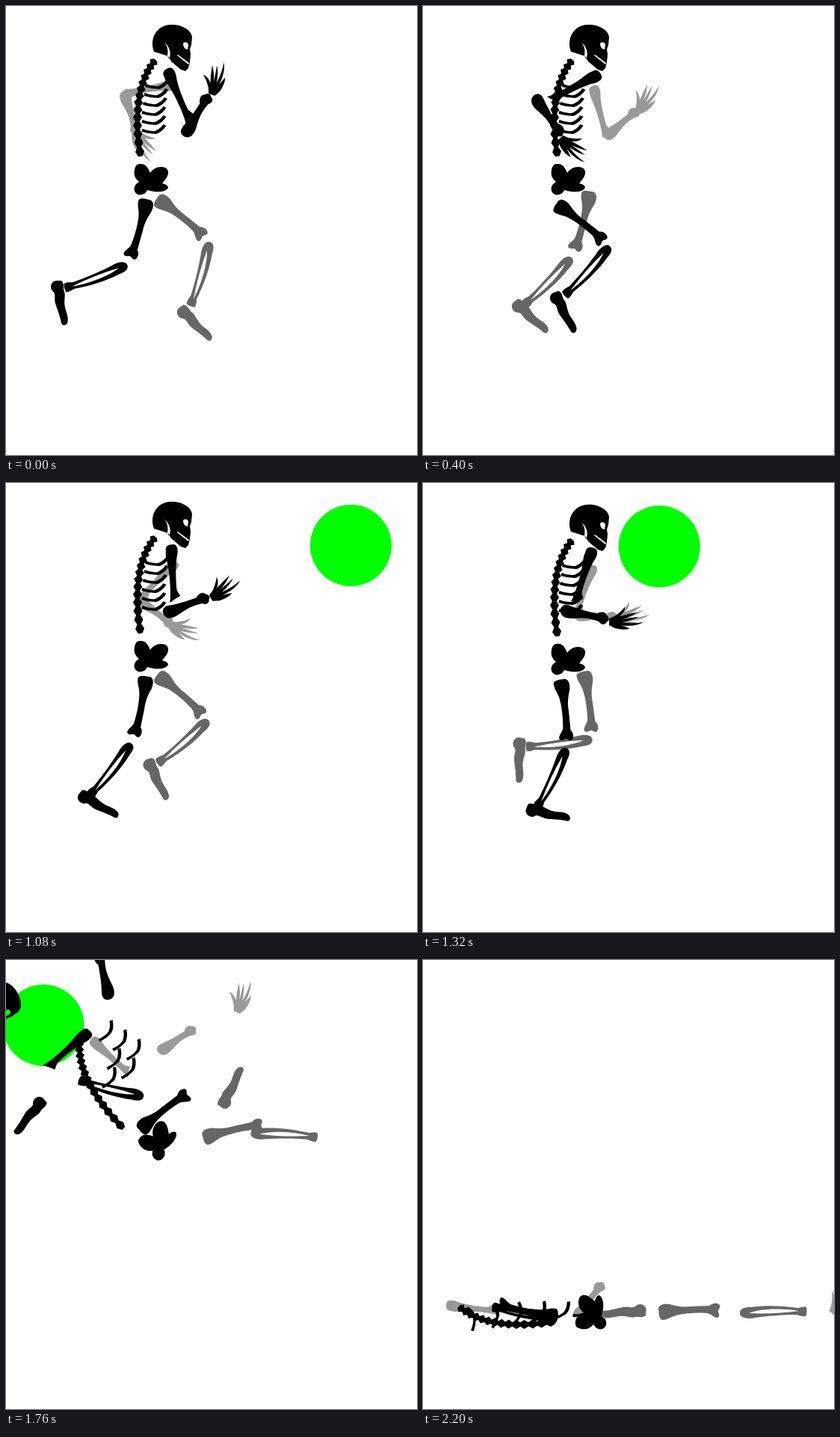
An HTML page that plays this animation: 550x600 px, repeating every 2360 ms.

```html
<!DOCTYPE html>
<html lang="en">
<head>
<meta charset="utf-8">
<title>Running skeleton</title>
<style>
  html, body { margin: 0; width: 100%; height: 100%; overflow: hidden; background: #fff; }
  svg { display: block; width: 550px; height: 600px; }
</style>
</head>
<body>
<svg id="stage" viewBox="0 0 550 600"></svg>
<script>
const LOOP = 2360, STEP = 40, LAST = 2200;
const STRIDE = 280;                          // one full running cycle
const HIT = 1370, BURST = 1520, APEX = 2000; // ball strikes, bones fly, bones drop
const BLACK = '#000', LEG = '#666', ARM = '#999';
const stage = document.getElementById('stage');

// Limb shapes run along +x from their upper joint.
const THIGH = 'M1 -2C2 -8 9 -9 16 -8C26 -5 34 -4 44 -5L70 -6C73 -10 80 -10 83 -7C85 -3 80 -1 81 2C83 6 83 10 79 10C74 9 72 5 66 4C52 3 38 4 28 6C18 8 14 13 6 13C1 11 2 3 1 -2Z';
const SHIN = 'M0 1C0 -5 5 -7 14 -7C34 -10 58 -9 78 -6C82 -7 86 -8 89 -7C90 -3 90 2 88 5C84 6 80 4 76 3C54 3 36 5 20 7C12 9 0 8 0 1ZM12 1C28 -5 56 -6 79 -2C56 1 34 2 12 1Z';
const FOOT = 'M0 -5C5 -9 10 -6 14 -7C20 -9 26 -5 36 -6C44 -7 50 -10 57 -7C61 -4 60 0 57 1C47 2 40 4 31 6C23 8 18 4 14 7C11 11 4 11 1 7C-2 3 0 0 0 -5Z';
const UPPER = 'M0 -1C0 -6 6 -7 12 -6C22 -3 44 -3 56 -4L63 -8C65 -3 68 1 71 5C60 3 40 4 26 6C18 7 14 9 8 8C2 9 0 5 0 -1Z';
const FORE = 'M0 2C-1 -4 4 -7 10 -6C22 -4 32 -4 44 -4C48 -8 54 -9 56 -5C60 -3 61 1 58 3C57 8 52 8 49 5C36 3 28 5 18 8C8 11 1 9 0 2Z';
const HAND = 'M0 -5L0 4L8 8Q20 11 28 8Q21 5 16 4Q36 6 46 -1Q34 2 17 0Q32 -3 39 -8Q28 -6 17 -4Q29 -8 37 -14Q26 -12 14 -8Q21 -14 21 -21Q16 -14 7 -8Z';
const SKULL = 'M-25 3C-29 -13 -20 -29 -2 -30C12 -31 27 -23 27 -13L26 -3L24 3L25 9C25 14 24 17 24 20L22 28L18 32L12 30L-1 19L-5 12L-24 6ZM15 -5C18 -8 22 -6 22 -3L21 3C17 3 15 -1 15 -5ZM-10 -6C-5 -1 -5 7 -6 11L-4 16C0 9 -3 -1 -10 -6ZM7 11L8 10L23 21L22 23Z';
const PELVIS = 'M-15 -20C-7 -21 -4 -15 -1 -8C3 -14 11 -18 19 -15C25 -12 24 -5 19 1L15 6C20 7 23 9 23 12C20 17 11 18 4 17L-5 15C-7 20 -12 22 -17 21C-23 19 -24 12 -20 7L-16 4C-22 -1 -23 -6 -22 -12C-21 -17 -19 -20 -15 -20Z';
const RIB = 'M0 -2Q9 2 17 1Q24 -2 28 -8L32 -6Q26 3 18 5Q8 5 -1 2Z';

// Zigzag column along a quadratic curve.
function spinePath() {
  const n = 28, left = [], right = [];
  for (let i = 0; i <= n; i++) {
    const u = i / n, v = 1 - u;
    const x = -68 * u * v - 20 * u * u, y = 80 * u * v + 129 * u * u;
    const dx = -68 * (v - u) - 40 * u, dy = 80 * (v - u) + 258 * u;
    const w = (i % 2 ? 6 : 2.8) / Math.hypot(dx, dy);
    left.push([x + dy * w, y - dx * w]);
    right.unshift([x - dy * w, y + dx * w]);
  }
  return 'M' + [...left, ...right].map(p => p.map(c => c.toFixed(1)).join(' ')).join('L') + 'Z';
}

const rad = deg => deg * Math.PI / 180;
const mix = (a, b, u) => a + (b - a) * u;
const knock = t => Math.min(1, Math.max(0, (t - HIT) / (BURST - HIT)));
const bob = t => 9 * Math.max(0, Math.sin(4 * Math.PI * t / STRIDE)) * (1 - knock(t));

// Smooth interpolation that never overshoots a key.
function curve(T, v, t) {
  let i = 1;
  while (t > T[i + 1]) i++;
  const slope = k => (v[k + 1] - v[k]) / (T[k + 1] - T[k]);
  const tangent = k => {
    const a = slope(k - 1), b = slope(k);
    return a * b <= 0 ? 0 : 2 * a * b / (a + b);
  };
  const h = T[i + 1] - T[i], u = (t - T[i]) / h, w = 1 - u;
  return v[i] * w * w * (1 + 2 * u) + v[i + 1] * u * u * (3 - 2 * u)
    + h * u * w * (tangent(i) * w - tangent(i + 1) * u);
}

// Joint angles at: push-off, kick, knee lift, reach, contact, drive.
const PHASES = [0, 0.07, 0.4, 0.5, 0.57, 0.9];
const wrapped = [-1, 0, 1].flatMap(n => PHASES.map(p => p + n));
const cycle = (...v) => p => curve(wrapped, [...v, ...v, ...v], p - Math.floor(p));

const hip = cycle(108, 115, 40, 41, 61, 106);
const knee = cycle(53, 77, 98, 67, 41, 26);
const ankle = cycle(-77, -82, -70, -58, -102, -94);
const shoulder = cycle(68, 84, 145, 172, 138, 82);
const elbow = cycle(-125, -117, -96, -97, -91, -111);
const wrist = () => -12;

function attach([px, py, pa], [x, y, a]) {
  const c = Math.cos(rad(pa)), s = Math.sin(rad(pa));
  return [px + x * c - y * s, py + x * s + y * c, pa + a];
}

const parts = [];

// run(t) gives [x, y, angle] until the burst; then the bone flies via one pose to rest.
function bone(d, fill, run, via, rest, { scale = 1, arch = 60 } = {}) {
  const node = document.createElementNS('http://www.w3.org/2000/svg', 'path');
  node.setAttribute('d', d);
  node.setAttribute('fill', fill);
  node.setAttribute('fill-rule', 'evenodd');
  stage.append(node);
  const launch = run(BURST);
  const pose = t => {
    if (t <= BURST) return run(t);
    if (t <= APEX) {
      const u = (t - BURST) / (APEX - BURST);
      const p = launch.map((v, j) => mix(v, via[j], u));
      p[1] -= 4 * arch * u * (1 - u);
      return p;
    }
    const u = (t - APEX) / (LAST - APEX);
    return via.map((v, j) => mix(v, rest[j], j === 1 ? u ** 1.4 : u));
  };
  parts.push(t => {
    const [x, y, a] = pose(t).map(v => v.toFixed(2));
    node.setAttribute('transform', `translate(${x} ${y}) rotate(${a}) scale(${scale})`);
  });
}

// A chain of bones swinging about an anchor; each link hangs from the one before.
function limb({ fill, phase, anchor: [x, y], pivot, shove: [dx, dy, da], scale }, links) {
  let up;
  for (const { d, bend, joint, via, rest } of links) {
    const parent = up;
    up = t => {
      const a = bend(t / STRIDE + phase), k = knock(t);
      if (parent) return attach(parent(t), [...joint, a]);
      return attach([x + k * dx, y + bob(t) + k * dy, a + k * da], [-pivot, 0, 0]);
    };
    bone(d, fill, up, via, rest, { scale: d === HAND ? 1 : scale });
  }
}

const trunk = (x, y, shove) => t => {
  const k = knock(t);
  return [x + k * shove[0], y + bob(t) + k * shove[1], k * shove[2]];
};

const ball = document.createElementNS('http://www.w3.org/2000/svg', 'circle');
ball.setAttribute('r', 54.5);
ball.setAttribute('fill', '#0f0');
stage.append(ball);

const KNEE = [94, 0], ANKLE = [95, 11];

// Far arm and leg
limb({ fill: ARM, phase: 0.5, anchor: [229, 106], pivot: 0, shove: [-80, -3, 13] }, [
  { d: UPPER, bend: shoulder, via: [81, 226, -2], rest: [31, 460, 8] },
  { d: FORE, bend: elbow, joint: [70, 3], via: [260, 191, -38], rest: [203, 477, -50] },
  { d: HAND, bend: wrist, joint: [56, 2], via: [421, 109, -95], rest: [547, 472, -45] }
]);
limb({ fill: LEG, phase: 0.5, anchor: [220, 269], pivot: 23, shove: [-9, 6, -50] }, [
  { d: THIGH, bend: hip, via: [325, 335, -78], rest: [314, 468, 0] },
  { d: SHIN, bend: knee, joint: KNEE, via: [405, 247, -77], rest: [424, 471, 0] },
  { d: FOOT, bend: ankle, joint: ANKLE, via: [330, 82, -114], rest: [298, 470, -180] }
]);

// Trunk
const spine = trunk(200, 72, [-46, 3, -8]);
bone(spinePath(), BLACK, spine, [43, 262, -63], [48, 463, -90]);
for (let i = 0; i < 6; i++) {
  bone(RIB, BLACK, t => attach(spine(t), [-13 - 1.5 * Math.min(i, 3), 34 + 12 * i, 0]),
    [104 + i * 37 % 90, 224 + 13 * i, -85], [66 + 27 * i, 495 - 4 * i, 14 * i - 90]);
}
bone(PELVIS, BLACK, trunk(194, 231, [-9, 7, -8]), [222, 362, -90], [224, 471, -90]);

// Near leg
limb({ fill: BLACK, phase: 0, anchor: [188, 269], pivot: 12, shove: [-5, -9, 0] }, [
  { d: THIGH, bend: hip, via: [178, 320, -111], rest: [181, 480, -166] },
  { d: SHIN, bend: knee, joint: KNEE, via: [122, 174, 257], rest: [181, 478, 190] },
  { d: FOOT, bend: ankle, joint: ANKLE, via: [-70, 120, 200], rest: [-120, 470, 180] }
]);

bone(SKULL, BLACK, trunk(222, 55, [-90, 0, 20]), [-155, 60, 80], [-300, 120, 110], { arch: 0 });

// Near arm
limb({ fill: BLACK, phase: 0, anchor: [223, 99], pivot: 17, shove: [-44, -2, -78], scale: 1.1 }, [
  { d: UPPER, bend: shoulder, via: [52, 231, 206], rest: [-30, 478, 190] },
  { d: FORE, bend: elbow, joint: [91, 15], via: [90, 54, -180], rest: [-20, 478, -170] },
  { d: HAND, bend: wrist, joint: [67, 3], via: [620, -40, -90], rest: [700, 470, -60] }
]);

function render(t) {
  ball.setAttribute('cx', 461.5 - 0.605 * (t - 1080));
  ball.setAttribute('cy', 83.5 + 0.0055 * (t - 1080));
  parts.forEach(draw => draw(t));
}

const start = performance.now();
function tick() {
  const t = (performance.now() - start) % LOOP;
  render(Math.min(LAST, Math.floor(t / STEP) * STEP));
  requestAnimationFrame(tick);
}
tick();
</script>
</body>
</html>
```
